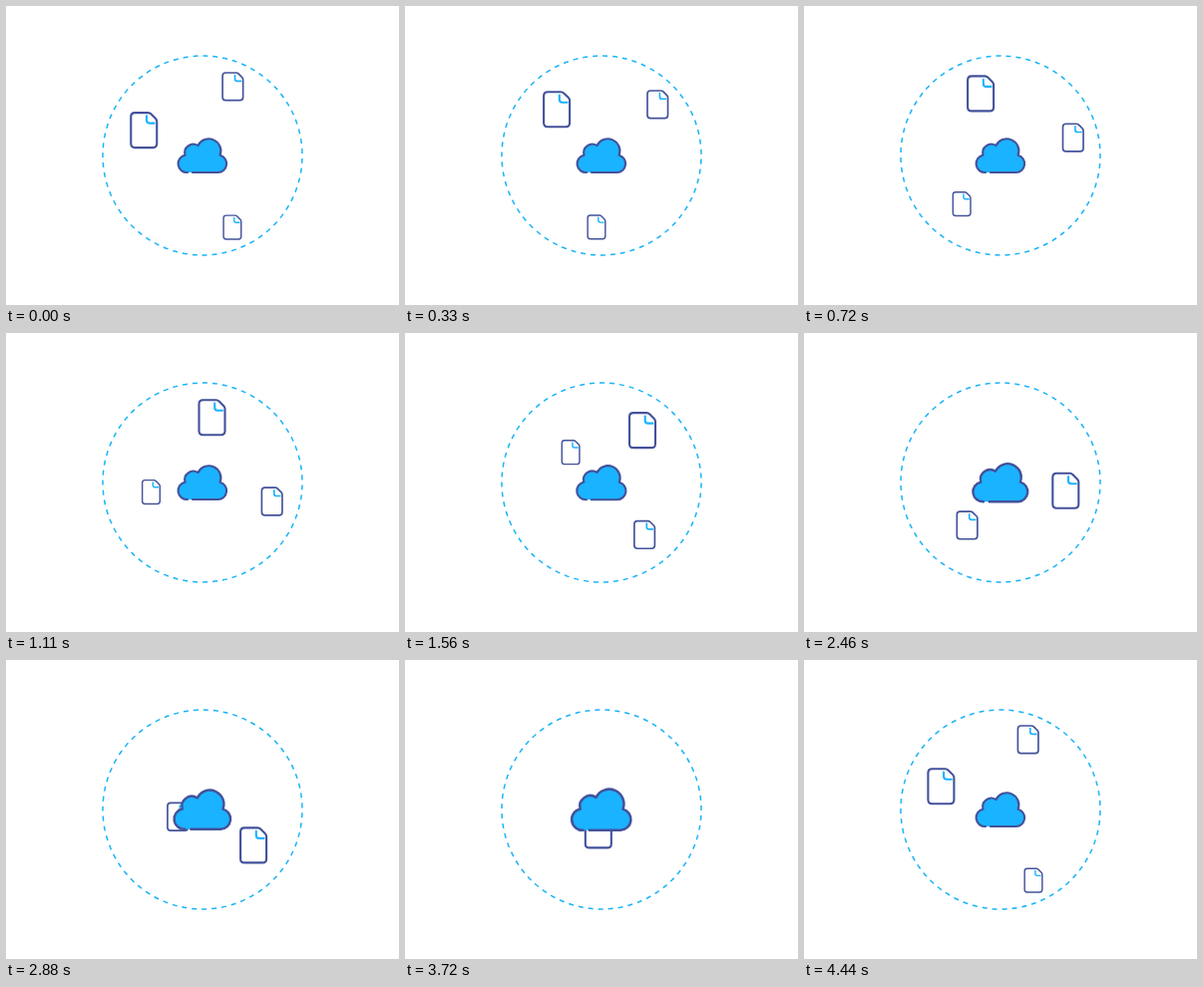
An HTML page for the animation above (4.47 s loop, 394 by 300 pixels).

```html
<!DOCTYPE html>
<html lang="en">
<head>
<meta charset="utf-8">
<title>Files to cloud</title>
<style>
  html, body { margin: 0; width: 100%; height: 100%; overflow: hidden; background: #fff; }
  svg { display: block; width: 394px; height: 300px; }
  .ink { stroke: #43529b; stroke-width: 2.1; stroke-linecap: round; stroke-linejoin: round; }
  .fold { fill: none; stroke: #1ab3ff; stroke-width: 2.1; stroke-linecap: round; }
</style>
</head>
<body>
<svg viewBox="0 0 394 300">
  <defs>
    <g id="file">
      <path class="ink" fill="#fff" d="M-9-17.5H4.2Q5.9-17.5 7.1-16.3L11.8-11.6Q13-10.4 13-8.7V13.5Q13 17.5 9 17.5H-9Q-13 17.5-13 13.5V-13.5Q-13-17.5-9-17.5Z"/>
      <path class="fold" d="M2.7-14.2V-10Q2.7-7 5.7-7H10.4"/>
    </g>
  </defs>
  <circle id="ring" cx="197" cy="150" r="100" fill="none" stroke="#1ab3f8" stroke-width="1.5" pathLength="630" stroke-dasharray="5 5"/>
  <use class="file" href="#file"/>
  <use class="file" href="#file"/>
  <use class="file" href="#file"/>
  <path id="cloud" class="ink" fill="#1ab3ff" d="M-10 17H15.6A8.8 8.8 0 0 0 17.6-.3A12.06 12.06 0 0 0-4.5-9.9A8.5 8.5 0 0 0-17.4-.4A8.8 8.8 0 0 0-15 17"/>
</svg>
<script>
const LOOP = 4.47, RESET = 4.1;
const DASH = 360 / 63, DASHES_PER_LOOP = 28;
const SINK = { x: 193, y: 152 };
const ring = document.getElementById('ring');
const cloud = document.getElementById('cloud');
const shapes = document.querySelectorAll('.file');

// Files circle at a steady speed (degrees, seconds) until the cloud swallows them.
const files = [
  { size: 0.68, x: 209.7, y: 160, r: 64.4, angle: 74.4, speed: 95.4, end: 1.95, gain: 0.12 },
  { size: 0.79, x: 202, y: 145, r: 69, angle: -68.5, speed: 80, end: 3.016, gain: 0.065 },
  { size: 1, x: 198.5, y: 149.5, r: 65.2, angle: 202.4, speed: 67.2, end: 3.857, gain: 0.05 }
];

const mix = (a, b, k) => a + (b - a) * k;

function draw(seconds) {
  const phase = seconds % LOOP;
  const t = phase < RESET ? phase : phase - LOOP;
  let scale = 1;
  files.forEach((f, i) => {
    const pull = Math.min(1, Math.max(0, t / f.end) ** 10);
    const a = (f.angle + f.speed * t) * Math.PI / 180;
    const x = mix(f.x + f.r * Math.cos(a), SINK.x, pull);
    const y = mix(f.y + f.r * Math.sin(a), SINK.y, pull);
    shapes[i].setAttribute('transform', `translate(${x} ${y}) scale(${f.size})`);
    shapes[i].style.display = pull < 1 ? '' : 'none';
    scale += f.gain * pull;
  });
  cloud.setAttribute('transform', `translate(197 150) scale(${scale})`);
  const turn = 1.6 + DASH * DASHES_PER_LOOP * phase / LOOP;
  ring.setAttribute('transform', `rotate(${turn} 197 150)`);
}

const start = performance.now();
function tick() {
  draw((performance.now() - start) / 1000);
  requestAnimationFrame(tick);
}
tick();
</script>
</body>
</html>
```
